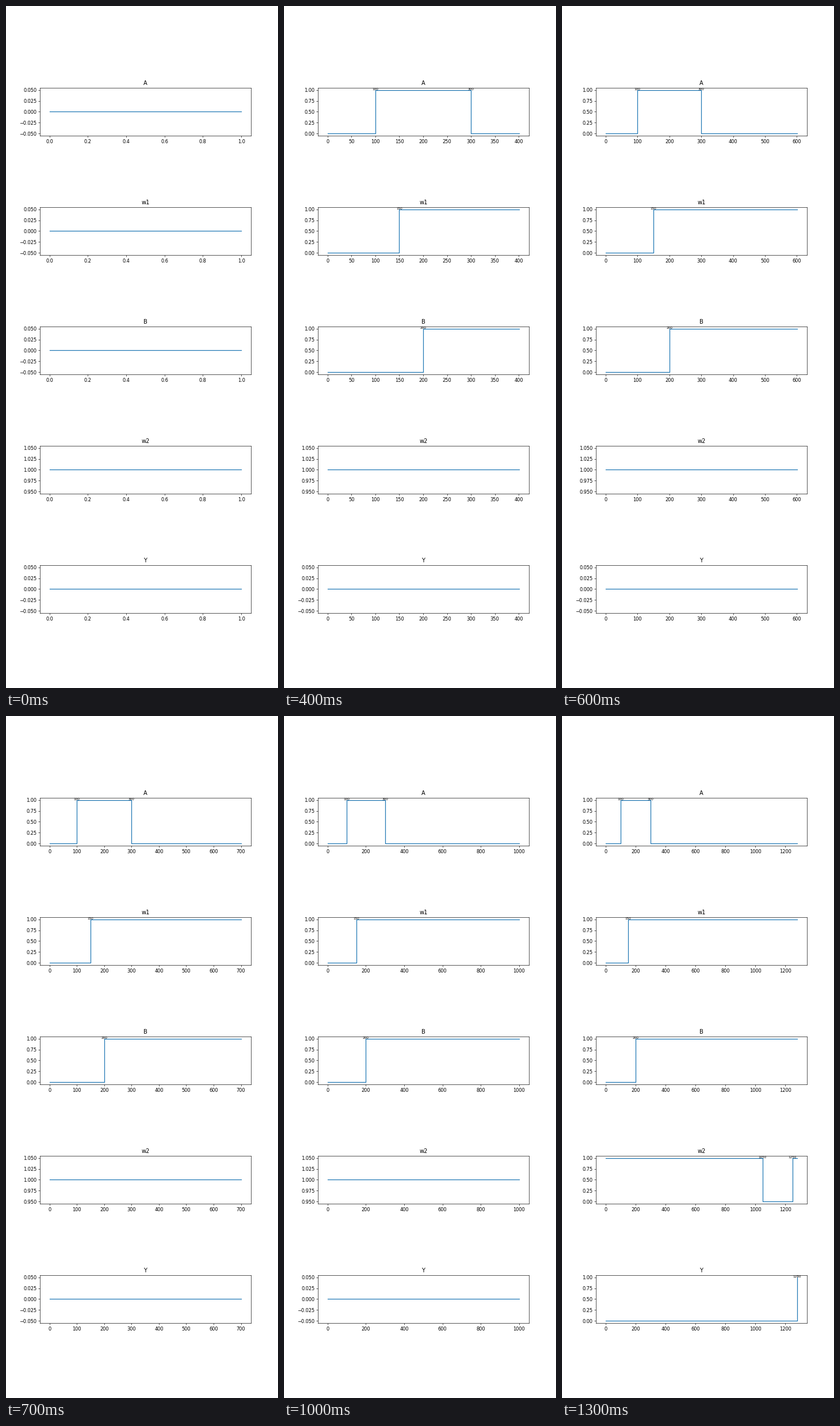
Recreate the animation shown at these times as a matplotlib script. Size 473 by 1183 pixels, loop 5 s.

```python
import matplotlib.pyplot as plt
from matplotlib.animation import FuncAnimation

STEP, LAST = 100, 1281
FRAMES, INTERVAL = 50, 100

# name: (initial level, times at which the signal toggles)
SIGNALS = {
    "A": (0, [100, 300]),
    "w1": (0, [150]),
    "B": (0, [200]),
    "w2": (1, [1050, 1250]),
    "Y": (0, [1280]),
}

plt.rcParams["font.family"] = "DejaVu Sans"
fig, axes = plt.subplots(5, 1, figsize=(8, 20.009), dpi=59.125)
fig.subplots_adjust(left=0.125, right=0.9, bottom=0.11, top=0.88, hspace=1.5)


def waveform(level, toggles, end):
    """Corner points of a square wave from 0 to end."""
    xs, ys = [0], [level]
    for t in toggles:
        xs += [t, t]
        ys += [level, 1 - level]
        level = 1 - level
    return xs + [end], ys + [level]


def draw_signal(ax, name, level, toggles, end):
    ax.clear()
    ax.set_title(name)
    seen = [t for t in toggles if t < end]
    ax.plot(*waveform(level, seen, end), color="#1f77b4", lw=1.5)
    for t in seen:
        ax.text(t, 1, str(t), fontsize=7, ha="center")


def update(i):
    end = min(i * STEP + 1, LAST)
    for ax, (name, (level, toggles)) in zip(axes, SIGNALS.items()):
        draw_signal(ax, name, level, toggles, end)


anim = FuncAnimation(fig, update, frames=FRAMES, interval=INTERVAL,
                     init_func=lambda: update(0), repeat=True, repeat_delay=0)
plt.show()
```
